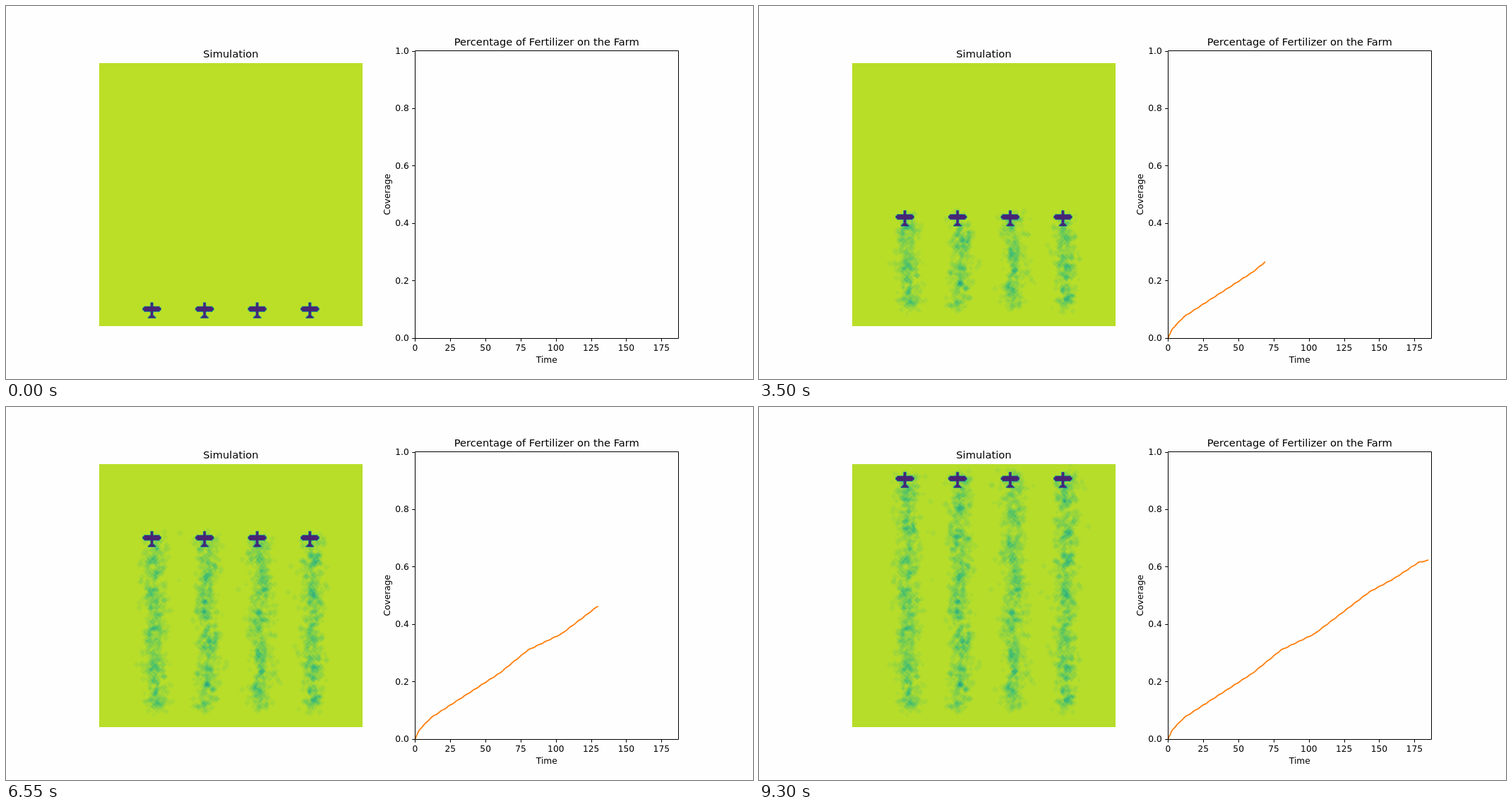
An HTML page with a canvas that plays this animation: 1058 by 529 pixels, repeating every 9350 ms.

```html
<!DOCTYPE html>
<html lang="en">
<head>
<meta charset="utf-8">
<title>Simulation</title>
<style>
  html, body { margin: 0; width: 100%; height: 100%; overflow: hidden; background: #fefefe; }
  canvas { display: block; }
</style>
</head>
<body>
<canvas id="stage" width="1058" height="529"></canvas>
<script>
const ctx = document.getElementById('stage').getContext('2d');
const STEP = 50, STEPS = 187, LAST_MOVE = 176;
const GRID = 200, LANES = [40, 80, 120, 160];
const FIELD = { x: 132, y: 81, size: 373 };
const PLOT = { left: 579.5, right: 952.5, top: 63.5, bottom: 471.5 };

// Viridis at 0.1, 0.3, 0.5, 0.7 and 0.9
const STOPS = [[72, 36, 117], [53, 95, 141], [33, 145, 140], [68, 191, 112], [189, 223, 38]];

function viridis(value) {
  const u = Math.max(0, Math.min(4, (value - 0.1) * 5));
  const k = Math.min(3, Math.floor(u));
  return STOPS[k].map((c, i) => c + (STOPS[k + 1][i] - c) * (u - k));
}
const palette = Array.from({ length: 1001 }, (_, i) => viridis(i / 1000));

let seed = 41;
function random() {
  seed = (Math.imul(seed, 1664525) + 1013904223) >>> 0;
  return (seed + 0.5) / 4294967296;
}
const gauss = () => Math.sqrt(-2 * Math.log(random())) * Math.cos(2 * Math.PI * random());

// Each plane sprays small diamonds just behind it, in uneven bursts
const drops = [];
for (let step = 1; step < STEPS; step++) {
  LANES.forEach((lane, k) => {
    const burst = 1 + 0.35 * Math.sin(step * 0.24 + 2 * k) + 0.25 * Math.sin(step * 0.43 + k);
    const count = step > LAST_MOVE ? 2 : Math.round(4.4 * burst + random() - 0.5);
    const middle = lane + 2.3 + Math.sin(step / 9 + 2 * k) + gauss() * 1.6;
    for (let i = 0; i < count; i++) {
      const spread = random() < 0.03 ? 2.2 : 1;
      drops.push({
        step,
        radius: random() < 0.7 ? 2 : 1,
        x: Math.floor(middle + gauss() * 4.1 * spread),
        y: Math.floor(186.5 - Math.min(step, LAST_MOVE) + gauss() * 2.4 * spread)
      });
    }
  });
}

function makeGrid(step) {
  const grid = new Float32Array(GRID * GRID).fill(0.897 - 0.008 * step / STEPS);
  for (const { step: born, radius, x, y } of drops) {
    if (born > step) break;
    for (let dy = -radius; dy <= radius; dy++) {
      const half = radius - Math.abs(dy);
      for (let dx = -half; dx <= half; dx++) {
        const col = x + dx, row = y + dy;
        if (col >= 0 && col < GRID && row >= 0 && row < GRID) grid[row * GRID + col] -= 0.026;
      }
    }
  }
  const nose = 182 - Math.min(step, LAST_MOVE);
  for (const lane of LANES) {
    const bar = (row, height, half) => {
      for (let y = nose + row; y < nose + row + height; y++) {
        grid.fill(0.1, y * GRID + lane - half, y * GRID + lane + half);
      }
    };
    bar(0, 11, 1);
    bar(3, 4, 6);
    bar(4, 2, 7);
    bar(10, 1, 2);
    bar(11, 1, 3);
  }
  return grid;
}

// Cell pair and Hann weight for every pixel along an axis
const samples = Array.from({ length: FIELD.size }, (_, p) => {
  const u = (p + 0.5) * GRID / FIELD.size - 0.5, a = Math.floor(u);
  const clamp = i => Math.max(0, Math.min(GRID - 1, i));
  return { a: clamp(a), b: clamp(a + 1), w: 0.5 - 0.5 * Math.cos(Math.PI * (u - a)) };
});
const image = ctx.createImageData(FIELD.size, FIELD.size);

function drawField(step) {
  const grid = makeGrid(step);
  const mix = (a, b, w) => a + (b - a) * w;
  let p = 0;
  for (const r of samples) {
    const top = r.a * GRID, low = r.b * GRID;
    for (const c of samples) {
      const value = mix(mix(grid[top + c.a], grid[top + c.b], c.w),
                        mix(grid[low + c.a], grid[low + c.b], c.w), r.w);
      const [red, green, blue] = palette[Math.max(0, Math.round(value * 1000))];
      image.data[p++] = red;
      image.data[p++] = green;
      image.data[p++] = blue;
      image.data[p++] = 255;
    }
  }
  ctx.putImageData(image, FIELD.x, FIELD.y);
}

function label(text, x, y, size = 12.25, align = 'center') {
  ctx.font = `${size}px "DejaVu Sans", sans-serif`;
  ctx.textAlign = align;
  ctx.fillText(text, x, y);
}

function segment(x1, y1, x2, y2) {
  ctx.beginPath();
  ctx.moveTo(x1, y1);
  ctx.lineTo(x2, y2);
  ctx.stroke();
}

const plotX = time => 579.5 + time * 372.7 / STEPS;
const plotY = value => 470.8 - value * 407.3;
const snap = v => Math.round(v) + 0.5;

function drawAxes() {
  ctx.fillStyle = ctx.strokeStyle = '#000';
  ctx.lineWidth = 1;
  ctx.strokeRect(PLOT.left, PLOT.top, PLOT.right - PLOT.left, PLOT.bottom - PLOT.top);
  for (let time = 0; time <= 175; time += 25) {
    const x = snap(plotX(time) - 0.1);
    segment(x, PLOT.bottom, x, PLOT.bottom + 4.3);
    label(time, plotX(time), 489);
  }
  for (let value = 0; value < 1.1; value += 0.2) {
    const y = snap(plotY(value));
    segment(PLOT.left - 4.3, y, PLOT.left, y);
    label(value.toFixed(1), 570.8, Math.round(plotY(value) + 4.3), 12.25, 'right');
  }
  label('Simulation', 318.4, 73, 14.7);
  label('Percentage of Fertilizer on the Farm', 765.8, 56, 14.7);
  label('Time', 765.8, 506);
  ctx.save();
  ctx.translate(544, 267.2);
  ctx.rotate(-Math.PI / 2);
  label('Coverage', 0, 0);
  ctx.restore();
}

// Coverage rises steeply at first, then steadily with a slight ripple
const KEYS = [[0, 0], [3, 0.032], [11, 0.073], [25, 0.118], [60, 0.229], [80, 0.309],
              [104, 0.366], [143, 0.512], [160, 0.557], [178, 0.615], [185, 0.622]];

function coverage(time) {
  const i = Math.max(1, KEYS.findIndex(([t]) => t >= time));
  const [t0, v0] = KEYS[i - 1], [t1, v1] = KEYS[i];
  return v0 + (v1 - v0) * (time - t0) / (t1 - t0) + 0.001 * Math.sin(time * 1.1);
}

function drawCurve(end) {
  ctx.strokeStyle = '#ff7f0e';
  ctx.lineWidth = 1.84;
  ctx.lineJoin = 'round';
  ctx.beginPath();
  for (let time = 0; time <= end; time++) ctx.lineTo(plotX(time), plotY(coverage(time)));
  ctx.stroke();
}

let shown = -1;
function frame() {
  const step = Math.floor(performance.now() / STEP) % STEPS;
  if (step !== shown) {
    shown = step;
    ctx.fillStyle = '#fefefe';
    ctx.fillRect(0, 0, 1058, 529);
    drawField(step);
    drawCurve(step - 1);
    drawAxes();
  }
  requestAnimationFrame(frame);
}
frame();
</script>
</body>
</html>
```
